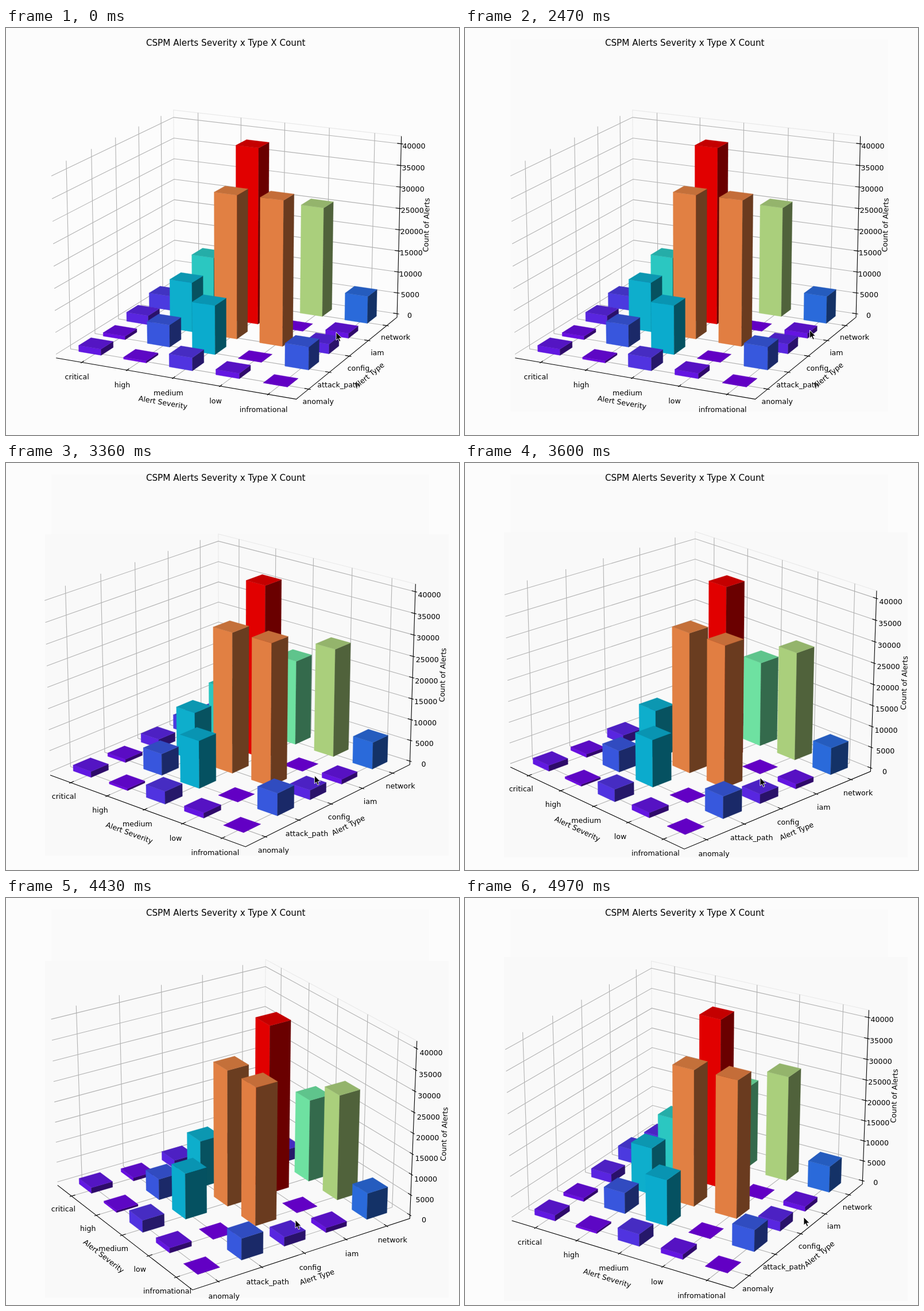
Recreate the animation shown at these times as an HTML page. Size 789x709 px, loop 4990 ms.

```html
<!DOCTYPE html>
<html lang="en">
<head>
<meta charset="utf-8">
<title>3D bar chart</title>
<style>
  html, body { margin: 0; width: 100%; height: 100%; overflow: hidden; background: #fcfcfc; }
  svg { display: block; width: 789px; height: 709px; font: 12.6px "DejaVu Sans", sans-serif; }
  text { text-anchor: middle; }
  .grid, .axis, .pane { fill: none; stroke-width: 1.1; }
  .grid { stroke: #b2b2b2; }
  .axis { stroke: #000; }
  .pane { stroke: #e9e9e9; }
  .bar { stroke-width: .4; stroke-linejoin: round; }
</style>
</head>
<body>
<svg id="stage" viewBox="0 0 789 709">
  <g id="back"></g>
  <text x="382.7" y="31" font-size="15.2">CSPM Alerts Severity x Type X Count</text>
  <g id="chart"></g>
  <path id="cursor" d="M0 0V14L3.2 11.1L5.5 16.3L7.8 15.3L5.6 10.2H10Z" fill="#000" stroke="#fff" stroke-width=".9"/>
</svg>
<script>
const LOOP = 4990, FIRST = 555, STEP = 59.6;
const PRESS = 2770;

const severities = ['critical', 'high', 'medium', 'low', 'infromational'];
// alert counts per type, in order of severity
const alerts = {
  anomaly: [1400, 450, 2950, 1200, 0],
  attack_path: [800, 5100, 11200, 0, 5200],
  config: [2150, 11500, 33000, 33200, 2230],
  iam: [3400, 14100, 40900, 0, 1150],
  network: [2500, 3000, 20200, 25700, 6400]
};
const types = Object.keys(alerts);
const MAX = Math.max(...Object.values(alerts).flat());

// mouse path: time, x, y
const path = [
  [500, 575, 530], [920, 616, 501], [1460, 634, 515], [1690, 634, 515], [2170, 598, 523],
  [PRESS, 603, 530], [3003, 572.4, 539.2], [3600, 514, 548.2], [4180, 472, 558],
  [4374, 481.4, 561.2], [4434, 504, 561], [4910, 577, 559], [4970, 590, 556]
];

const mix = (a, b, f) => a + (b - a) * f;

function mouse(t) {
  const i = path.findIndex(p => p[0] >= t);
  if (i < 1) return path.at(i).slice(1);
  const [t0, x0, y0] = path[i - 1], [t1, x1, y1] = path[i];
  const f = (t - t0) / (t1 - t0);
  return [mix(x0, x1, f), mix(y0, y1, f)];
}

// dragging turns the chart, one step behind the mouse
function view(t) {
  const [x0, y0] = mouse(PRESS);
  const [x, y] = mouse(Math.max(PRESS, t - STEP));
  return camera(-64.5 - .255 * (x - x0), 17.3 + .26 * (y - y0));
}

// plot box: inner half sizes, and outer ones with 1/24 padding
const HALF = 4 / 7, TALL = 3 / 7;
const W = HALF * 25 / 24, H = TALL * 25 / 24;
const flat = v => (v - 2.25) * 2 * HALF / 4.95;
const lift = n => n / MAX * 2 * TALL - TALL;

function camera(azim, elev) {
  const A = azim * Math.PI / 180, E = elev * Math.PI / 180;
  const s = -Math.sin(A), c = Math.cos(A), sinE = Math.sin(E), cosE = Math.cos(E);
  return (x, y, z) => {
    const q = c * x - s * y;
    const k = 3789 / (10 - cosE * q - sinE * z);
    return [392 + (s * x + c * y) * k, 379 - (cosE * z - sinE * q) * k];
  };
}

const d = pts => 'M' + pts.map(p => p[0].toFixed(2) + ' ' + p[1].toFixed(2)).join('L');
const line = (cls, ...pts) => `<path class="${cls}" d="${d(pts)}"/>`;
const rect = (l, t, r, b, fill) =>
  `<rect x="${l}" y="${t}" width="${r - l}" height="${b - t}" fill="${fill}"/>`;
const label = (p, dy, str) =>
  `<text x="${p[0].toFixed(2)}" y="${(p[1] + dy).toFixed(2)}">${str}</text>`;

function axisName(p, dy, from, to, str) {
  const turn = Math.atan2(to[1] - from[1], to[0] - from[0]) * 180 / Math.PI;
  return `<text transform="translate(${p[0]} ${p[1] + dy}) rotate(${turn})" y="4">${str}</text>`;
}

// rainbow colour of a count, dimmed by the light on the face
function shade(n, light) {
  const v = n / MAX;
  const rgb = [Math.abs(2 * v - .5), Math.sin(Math.PI * v), Math.cos(Math.PI * v / 2)];
  return `rgb(${rgb.map(ch => Math.round(255 * light * Math.min(1, Math.max(0, ch))))})`;
}

function bar(P, i, j, n) {
  const x0 = flat(i), x1 = flat(i + .5), y0 = flat(j), y1 = flat(j + .5);
  const z0 = lift(0), z1 = lift(n);
  const face = (light, ...pts) => {
    const fill = shade(n, light);
    return `<path class="bar" fill="${fill}" stroke="${fill}" d="${d(pts.map(p => P(...p)))}Z"/>`;
  };
  return face(.883, [x0, y0, z0], [x1, y0, z0], [x1, y0, z1], [x0, y0, z1]) +
    face(.417, [x1, y0, z0], [x1, y1, z0], [x1, y1, z1], [x1, y0, z1]) +
    face(.767, [x0, y0, z1], [x1, y0, z1], [x1, y1, z1], [x0, y1, z1]);
}

function chart(P) {
  const IN = .02, OUT = .01, PAD = .046, FAR = .1;
  let grid = '', ticks = '', text = '', bars = '';
  for (let i = 0; i < 5; i++) {
    const v = flat(i + .25);
    grid += line('grid', P(v, -W, -H), P(v, W, -H), P(v, W, H));
    grid += line('grid', P(W, v, -H), P(-W, v, -H), P(-W, v, H));
    ticks += line('axis', P(v, -W - OUT, -H), P(v, -W + IN, -H));
    ticks += line('axis', P(W + OUT, v, -H), P(W - IN, v, -H));
    text += label(P(v, -W - PAD, -H - PAD), 7, severities[i]);
    text += label(P(W + PAD, v, -H - PAD), 6.3, types[i]);
  }
  for (let n = 0; n <= MAX; n += 5000) {
    const z = lift(n);
    grid += line('grid', P(-W, -W, z), P(-W, W, z), P(W, W, z));
    ticks += line('axis', P(W + OUT, W, z), P(W - IN, W, z));
    text += label(P(W + PAD, W + PAD, z), 10.2, n);
  }
  const left = P(-W, -W, -H), front = P(W, -W, -H), right = P(W, W, -H), top = P(W, W, H);
  text += axisName(P(0, -W - FAR, -H - FAR), -7, left, front, 'Alert Severity');
  text += axisName(P(W + FAR, 0, -H - FAR), -8, front, right, 'Alert Type');
  text += axisName(P(W + FAR, W + FAR, 0), 0, right, top, 'Count of Alerts');
  // back to front
  for (let j = 4; j >= 0; j--)
    alerts[types[j]].forEach((n, i) => bars += bar(P, i, j, n));
  return line('pane', P(-W, W, -H), P(-W, W, H), top) + grid +
    line('axis', left, front, right, top) + ticks + text + bars;
}

function backdrop(t) {
  let out = rect(0, 0, 789, 709, '#fcfcfc');
  if (t > 1090) out += rect(79.5, 20, 737, 667.5, '#fafafa');
  if (t > 2800) {
    const f = (t - 2800) / (LOOP - 2800);
    out += rect(68, mix(131, 103, f), 771, mix(678, 702, f), '#f9f9f9');
  }
  return out;
}

const $ = id => document.getElementById(id);
let shown = null;

function draw(time) {
  const k = Math.max(-1, Math.floor((time - FIRST) / STEP));
  if (k === shown) return;
  shown = k;
  const t = k < 0 ? 0 : Math.min(FIRST + 5 + k * STEP, 4970);
  $('back').innerHTML = backdrop(t);
  $('chart').innerHTML = chart(view(t));
  $('cursor').setAttribute('transform', `translate(${mouse(t)})`);
}

const start = performance.now();
function tick() {
  draw((performance.now() - start) % LOOP);
  requestAnimationFrame(tick);
}
tick();
</script>
</body>
</html>
```
